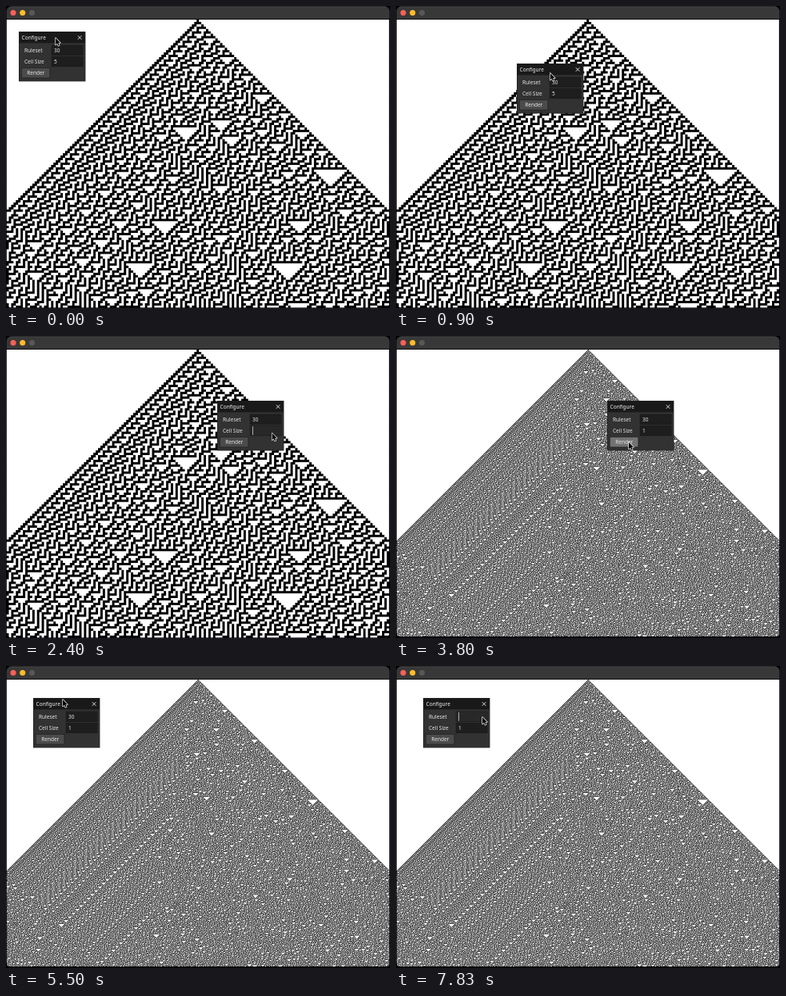
Recreate the animation shown at these times as an HTML page with a canvas. Size 480 by 378 pixels, loop 8 s.

```html
<!DOCTYPE html>
<html lang="en">
<head>
<meta charset="utf-8">
<title>Cellular automaton</title>
<style>
  html, body { margin: 0; width: 100%; height: 100%; overflow: hidden; background: #000; }
  canvas { display: block; }
</style>
</head>
<body>
<canvas id="stage" width="480" height="378"></canvas>
<script>
const LOOP = 8000;
const SCALE = 480 / 818;          // an 816 x 612 view with a one-pixel border
const VIEW = { width: 816, height: 612, left: SCALE, top: 29 * SCALE };
const ctx = document.getElementById('stage').getContext('2d');
const gray = v => `rgb(${v},${v},${v})`;

// Eased moves one after another; bend pushes the middle of a move down
function travel(t, [x, y], moves) {
  for (const { to, start, end, bend = 0 } of moves) {
    const u = Math.min(1, Math.max(0, (t - start) / (end - start)));
    const k = u * u * (3 - 2 * u);
    x += (to[0] - x) * k;
    y += (to[1] - y) * k + bend * Math.sin(Math.PI * u);
  }
  return [x, y];
}

const panelAt = t => travel(t, [16, 32], [
  { to: [264, 81], start: 230, end: 1500, bend: 13 },
  { to: [34, 40], start: 4868, end: 5178, bend: -6 }
]);

const pointerAt = t => travel(t, [62, 40], [
  { to: [303, 90], start: 230, end: 1500, bend: 17 },
  { to: [332.6, 121.6], start: 1500, end: 1870 },
  { to: [291, 133], start: 3170, end: 3530 },
  { to: [302, 86], start: 4330, end: 4650 },
  { to: [71, 42], start: 4797, end: 5107, bend: 4 },
  { to: [108, 64], start: 5630, end: 6230 }
]);

// Elementary automaton on a ring. Adding up the partial cover of each
// white cell gives every pixel its average brightness.
function automaton(rule, cellSize) {
  const columns = Math.floor(VIEW.width / cellSize);
  const rows = Math.ceil(VIEW.height / cellSize);
  const size = cellSize * SCALE;
  const canvas = document.createElement('canvas');
  canvas.width = 480;
  canvas.height = 378;
  const g = canvas.getContext('2d', { willReadFrequently: true });
  g.fillRect(0, 0, 480, 378);
  g.globalCompositeOperation = 'lighter';
  g.fillStyle = '#fff';

  let cells = new Uint8Array(columns);
  cells[columns >> 1] = 1;
  for (let row = 0; row < rows; row++) {
    for (let from = 0, to; from < columns; from = to + 1) {
      to = cells.indexOf(1, from);
      if (to < 0) to = columns;
      if (to > from) g.fillRect(VIEW.left + from * size, VIEW.top + row * size, (to - from) * size, size);
    }
    cells = cells.map((cell, i) => {
      const left = cells[(i + columns - 1) % columns], right = cells[(i + 1) % columns];
      return rule >> (left * 4 + cell * 2 + right) & 1;
    });
  }
  return canvas;
}

const coarse = automaton(30, 5);
const fine = automaton(30, 1);

function rect(x, y, w, h, color) {
  ctx.fillStyle = color;
  ctx.fillRect(x, y, w, h);
}

function text(string, x, y, color = gray(230)) {
  ctx.font = '500 6.5px "Noto Sans", "Open Sans", sans-serif';
  ctx.fillStyle = color;
  ctx.fillText(string, x, y);
}

function framed(x, y, w, h, color) {
  rect(x - SCALE, y - SCALE, w + 2 * SCALE, h + 2 * SCALE, gray(25));
  rect(x, y, w, h, color);
}

function field(label, value, y, focused) {
  text(label, 7, y + 8.6);
  framed(41.4, y, 38.6, 12, gray(focused ? 40 : 30));
  text(value, 44, y + 8.6);
  if (focused) rect(44 + ctx.measureText(value).width, y + 0.6, 0.7, 10.8, gray(230));
}

function drawWindow(t) {
  ctx.beginPath();
  ctx.roundRect(SCALE, SCALE, 480 - 2 * SCALE, 378 - 2 * SCALE, 6);
  ctx.clip();
  ctx.drawImage(t < 3770 ? coarse : fine, 0, 0);
  rect(0, 0, 480, VIEW.top, '#000');
  rect(0, 0, 480, VIEW.top - 0.8, gray(56));
  rect(0, SCALE, 480, SCALE, gray(100));
  ['#ff5f57', '#febc2e', gray(88)].forEach((color, i) => {
    ctx.fillStyle = color;
    ctx.beginPath();
    ctx.arc(9 + 20 * SCALE * i, 8.4, 6 * SCALE, 0, Math.PI * 2);
    ctx.fill();
  });
}

function drawPanel(t) {
  const [x, y] = panelAt(t);
  ctx.translate(Math.round(x), Math.round(y));
  framed(0.6, 0.6, 82.2, 61.2, gray(50));
  rect(0.6, 0.6, 82.2, 13.8, gray(25));
  text('Configure', 3.6, 10.1, gray(240));

  ctx.strokeStyle = gray(240);
  ctx.lineWidth = 0.9;
  ctx.translate(76.1, 7.5);
  ctx.beginPath();
  for (const side of [-2.3, 2.3]) {
    ctx.moveTo(side, -2.3);
    ctx.lineTo(-side, 2.3);
  }
  ctx.stroke();
  ctx.translate(-76.1, -7.5);

  const ruleset = t < 7170 ? '30' : t < 7400 ? '3' : '';
  const cellSize = t < 2200 ? '5' : t < 2800 ? '' : '1';
  field('Ruleset', ruleset, 17.3, t >= 6800);
  field('Cell Size', cellSize, 31.5, t >= 1930 && t < 3770);

  const pressed = t >= 3770 && t < 3900, hovered = t >= 3400 && t < 4400;
  framed(3.6, 45.7, 35, 12, gray(pressed ? 115 : hovered ? 95 : 75));
  text('Render', 10.2, 54.2);
}

function drawPointer(t) {
  ctx.translate(...pointerAt(t));
  ctx.beginPath();
  ctx.moveTo(0, 0);
  ctx.lineTo(0, 8.6);
  ctx.lineTo(2, 6.8);
  ctx.lineTo(3.3, 9.8);
  ctx.lineTo(4.7, 9.2);
  ctx.lineTo(3.4, 6.3);
  ctx.lineTo(6, 6.2);
  ctx.closePath();
  ctx.lineJoin = 'round';
  ctx.lineWidth = 1.3;
  ctx.strokeStyle = '#fff';
  ctx.stroke();
  ctx.fillStyle = '#000';
  ctx.fill();
}

const start = performance.now();
function frame() {
  const t = (performance.now() - start) % LOOP;
  rect(0, 0, 480, 378, '#000');
  for (const layer of [drawWindow, drawPanel, drawPointer]) {
    ctx.save();
    layer(t);
    ctx.restore();
  }
  requestAnimationFrame(frame);
}
frame();
</script>
</body>
</html>
```
